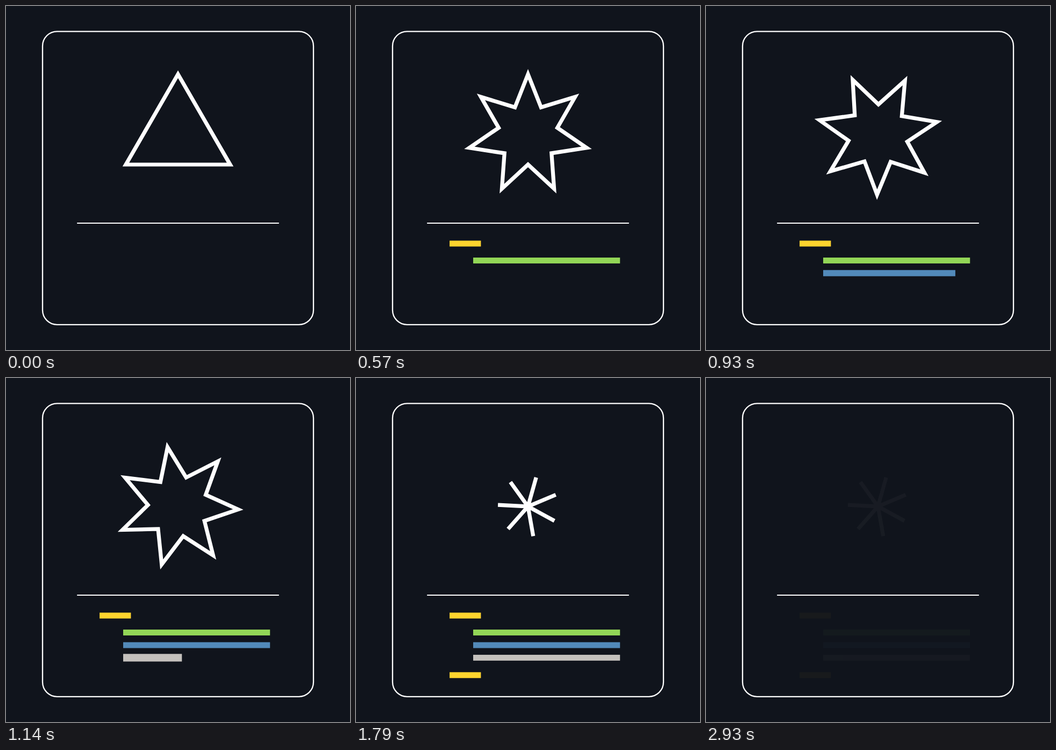
An HTML page that plays this animation: 640x640 px, repeating every 3210 ms.

```html
<!DOCTYPE html>
<html lang="en">
<head>
<meta charset="utf-8">
<title>Star card</title>
<style>
  html, body { margin: 0; height: 100%; overflow: hidden; background: #10141c; }
  svg { display: block; width: 100vw; height: 100vh; }
</style>
</head>
<body>
<svg viewBox="0 0 640 640">
  <g fill="none" stroke="#fff">
    <rect x="68" y="47.4" width="504" height="545.4" rx="27" stroke-width="2.3"/>
    <path d="M133 404H507" stroke-width="2.2" stroke-linecap="round"/>
  </g>
  <g id="art">
    <path id="star" fill="none" stroke="#fff" stroke-width="7.2" stroke-miterlimit="4"/>
  </g>
</svg>
<script>
const FPS = 14, LOOP = 3210;
const CX = 320, CY = 239, OUTER = 112, INNER = 56, BAR_H = 10.92;
const art = document.getElementById('art');
const star = document.getElementById('star');

const clamp = v => Math.min(1, Math.max(0, v));
const ease = p => p < 0.5 ? 4 * p ** 3 : 1 - 4 * (1 - p) ** 3;
const progress = (f, start, length) => clamp((f - start) / length);

// start and length are in steps of 1/14 s
const bars = [
  { x: 174.1, y: 442, w: 58.3, color: '#ffd42e', start: 0, length: 2.75 },
  { x: 218, y: 473.5, w: 273.2, color: '#92d657', start: 3, length: 5 },
  { x: 218, y: 497, w: 273.2, color: '#528aba', start: 8.5, length: 5 },
  { x: 218, y: 520.4, w: 273.2, color: '#c4c1bd', start: 14, length: 5 },
  { x: 174.1, y: 552.8, w: 58.3, color: '#ffd42e', start: 19.5, length: 2.5 }
];
for (const bar of bars) {
  bar.el = document.createElementNS(star.namespaceURI, 'rect');
  bar.el.setAttribute('x', bar.x);
  bar.el.setAttribute('fill', bar.color);
  art.append(bar.el);
}

function starPath(points, outer, turn) {
  const list = [];
  for (let i = 0; i < points * 2; i++) {
    const a = turn * Math.PI / 180 + i * Math.PI / points;
    const r = i % 2 ? INNER : outer;
    list.push((CX + r * Math.sin(a)).toFixed(3) + ',' + (CY - r * Math.cos(a)).toFixed(3));
  }
  return 'M' + list.join('L') + 'Z';
}

function draw(f) {
  for (const { el, y, w, start, length } of bars) {
    const p = progress(f, start, length);
    const h = BAR_H * (1.5 - p / 2);
    el.setAttribute('y', y - h / 2);
    el.setAttribute('width', w * p);
    el.setAttribute('height', h);
  }
  const points = Math.floor(3 + 4 * progress(f, 3, 5));
  const turn = 350 * ease(progress(f, 8.5, 7.05));
  const outer = OUTER * (1 - ease(progress(f, 16, 9)));
  star.setAttribute('d', starPath(points, outer, turn));
  art.setAttribute('opacity', clamp(1 - (Math.min(f, 41) - 37.2) * 0.255));
}

// Steps fall on multiples of 10 ms
function stepAt(ms) {
  return Math.floor((Math.floor(ms / 10) * 10 + 5) * FPS / 1000);
}

const begin = performance.now();
function tick() {
  draw(stepAt((performance.now() - begin) % LOOP));
  requestAnimationFrame(tick);
}
tick();
</script>
</body>
</html>
```
